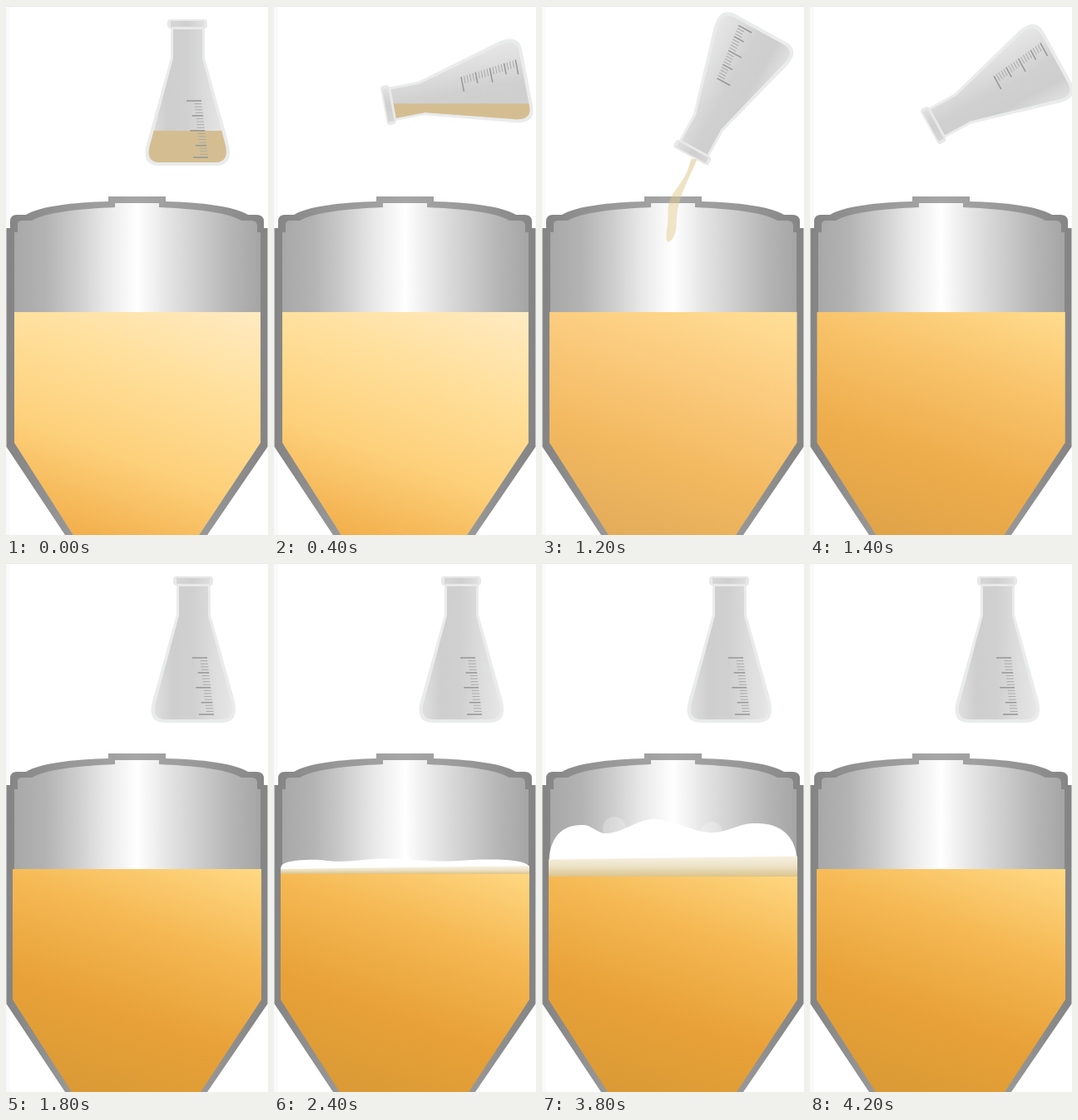
These frames come from a looping animation (315 by 636 pixels, 6.2 s). An HTML page with a canvas:

```html
<!DOCTYPE html>
<html lang="en">
<head>
<meta charset="utf-8">
<title>Pitching yeast</title>
<style>
  html, body { margin: 0; width: 100%; height: 100%; overflow: hidden; background: #fff; }
  canvas { display: block; width: 315px; height: 636px; }
</style>
</head>
<body>
<canvas id="stage"></canvas>
<script>
const W = 315, H = 636, LOOP = 6200, STEP = 200;
const canvas = document.getElementById('stage');
const ratio = window.devicePixelRatio || 1;
canvas.width = W * ratio;
canvas.height = H * ratio;
const c = canvas.getContext('2d');
c.scale(ratio, ratio);

const lerp = (a, b, k) => a + (b - a) * k;
const clamp = v => Math.max(0, Math.min(1, v));
const linear = k => k;
const wave = k => (1 - Math.cos(Math.PI * k)) / 2;

// Value at x between sorted [x, value] points
function along(points, x, ease = linear) {
  const i = points.findIndex(p => p[0] >= x);
  if (i < 0) return points[points.length - 1][1];
  if (i === 0) return points[0][1];
  const [x0, a] = points[i - 1], [x1, b] = points[i];
  return lerp(a, b, ease((x - x0) / (x1 - x0)));
}

function mix(a, b, k) {
  const part = (s, i) => parseInt(s.slice(i, i + 2), 16);
  return 'rgb(' + [1, 3, 5].map(i => Math.round(lerp(part(a, i), part(b, i), k))) + ')';
}

// Evenly spaced colours
function gradient(x0, y0, x1, y1, colors) {
  const g = c.createLinearGradient(x0, y0, x1, y1);
  colors.forEach((color, i) => g.addColorStop(i / (colors.length - 1), color));
  return g;
}

function fill(path, style) {
  c.fillStyle = style;
  c.fill(path);
}

function polygon(points) {
  const p = new Path2D();
  points.forEach(([x, y]) => p.lineTo(x, y));
  p.closePath();
  return p;
}

// ---- Tank ----
const shell = new Path2D('M.5 267H5V259Q5 251 13 251H24C40 241 80 236 123 235V229H192V235' +
  'C235 236 275 241 291 251H301Q310 251 310 259V267H314.5V530L242 636H71L.5 530Z');
const inside = new Path2D('M10 272H14V262Q14 258 20 258H31C48 248 88 244 131 242V237H184V242' +
  'C227 244 267 248 283 258H295Q302 258 302 264V272H306V525L232 636H81L10 525Z');

function drawTank() {
  fill(shell, gradient(0, 0, W, 0, ['#848484', '#989898', '#a6a6a6', '#989898', '#848484']));
  fill(inside, gradient(10, 0, 306, 0, ['#a8a8a8', '#b3b3b3', '#cccccc', '#e9e9e9', '#ffffff',
    '#e4e4e4', '#cdcdcd', '#b6b6b6', '#a5a5a5']));
}

const BEER = [
  ['#ffeac2', '#ffdf9a', '#fdd07a', '#f2ae4a'],
  ['#ffdf97', '#fbcb7e', '#f3b960', '#e3ac5a'],
  ['#ffd984', '#f5b853', '#e8a138', '#da9a35'],
];

function drawBeer(k) {
  const from = Math.min(1, Math.floor(k * 2));
  const colors = BEER[from].map((color, i) => mix(color, BEER[from + 1][i], k * 2 - from));
  const grow = 2 * k;
  fill(polygon([[10 - grow, 368], [306 + grow / 2, 368], [306 + grow / 2, 525],
    [232 + grow, H], [81 - grow, H], [10 - grow, 525]]), gradient(306, 368, 198, 678, colors));
}

// ---- Flask, drawn around its own centre ----
const glass = new Path2D('M-20 -80H21V-44L49 57Q57 86 34 86H-34Q-57 86 -48 57L-20 -44Z');
const hollow = new Path2D('M-17 -78H18V-43L45 58Q52 82 33 82H-33Q-52 82 -44 58L-17 -43Z');
const rim = new Path2D();
rim.roundRect(-24, -90, 48, 11, 4);

function drawTicks() {
  for (let i = 0; i < 20; i++) {
    const k = i / 19, major = i % 5 === 0 || k === 1;
    const x = 17 + 8 * k, y = 8 + 68 * k;
    const length = major ? (i % 10 === 5 ? 13.5 : 18) : 9;
    c.beginPath();
    c.moveTo(x - length, y);
    c.lineTo(x, y);
    c.lineWidth = major ? 1.5 : 1;
    c.strokeStyle = major ? '#969696' : '#aaaaaa';
    c.stroke();
  }
}

function drawFlask(t) {
  const back = t >= 1200;
  const k = back ? 1 - clamp((t - 1200) / 600) ** 1.4 : clamp(t / 600);
  const turn = k * 151.2 * Math.PI / 180;
  c.save();
  c.translate(lerp(back ? 225 : 218, 221.5, k), lerp(106, 102, k));
  c.rotate(-turn);
  fill(glass, '#eaebeb');
  fill(hollow, gradient(-50, 0, 50, 0, ['#e2e2e2', '#cecece', '#d0d0d0', '#dddddd', '#e7e7e7']));
  if (!back && k < 1) {
    c.save();
    c.clip(hollow);
    c.rotate(turn);
    c.fillStyle = '#d4be91';
    c.fillRect(-110, 44 - 45 * k, 220, 140);
    c.restore();
  }
  fill(rim, '#e8e8e8');
  c.fillStyle = gradient(-21, 0, 21, 0, ['#d6d6d6', '#cfcfcf', '#e0e0e0']);
  c.fillRect(-20, -88, 40, 7);
  drawTicks();
  c.restore();
}

// ---- Poured yeast: a bending stream with bulges ----
function drawStream({ end, width, drift, alpha }) {
  const left = [], right = [];
  for (let y = 184; y <= end; y += 2) {
    const u = (y - 184) / 185;
    const middle = 138 + 45 * (1 - u) ** 2.6 + drift * u + 2 * Math.sin(u * 17);
    const tip = end < 369 ? Math.sqrt(clamp((end - y) / 16)) : 1;
    const half = (5 + 7 * clamp(u / 0.55) + 1.6 * Math.cos(20 * (u - 0.58))) * width * tip;
    left.push([middle - half, y]);
    right.unshift([middle + half, y]);
  }
  c.globalAlpha = alpha;
  fill(polygon([...left, ...right]), gradient(0, 184, 0, 369, ['#d9c083', '#e4cc90', '#e0c98c', '#ead6a2']));
  c.globalAlpha = 1;
}

function drawPour(t) {
  if (t < 600 || t >= 1400) return;
  const fade = clamp((t - 800) / 400);
  drawStream({
    end: t < 1200 ? 369 : 284,
    width: t < 800 ? 0.8 : lerp(1, 0.6, fade),
    drift: 14 * fade,
    alpha: lerp(1, 0.5, fade),
  });
}

// ---- Foam ----
const LEVEL = [[2200, 0.12], [2800, 0.35], [3000, 0.46], [3400, 1.2], [3800, 1], [4000, 0.46]];
const CREST = [[9, 52], [50, 52], [76, 42], [135, 59], [205, 43], [255, 54], [307, 54]];

function crest(x) {
  const off = Math.max((50 - x) / 42, (x - 255) / 52, 0);
  return along(CREST, x, wave) * (1 - Math.min(1, off) ** 2.5) ** 0.4;
}

function drawBubble(x, y, r) {
  c.fillStyle = 'rgba(255,255,255,.25)';
  c.beginPath();
  c.arc(x, y, r, 0, Math.PI * 2);
  c.fill();
}

function drawFoam(t) {
  if (t < 2200 || t >= 4200) return;
  const k = along(LEVEL, t);
  if (k > 0.3) {
    drawBubble(87, 367 - 48 * k, 8.5 + 5.5 * k);
    drawBubble(231 - 27 * k, 367 - 43 * k, 8 + 5 * k);
  }
  const points = [[8, 370]];
  for (let x = 8; x <= 307; x++) points.push([x, 367 - crest(x) * k]);
  fill(polygon([...points, [307, 370]]), '#ffffff');

  const top = 367 - 11.5 * clamp((k - 0.45) / 0.55), bottom = 373 + 4 * Math.min(k, 1);
  fill(polygon([[8, top + 1], [307, top - 3], [307, bottom], [8, bottom]]),
    gradient(0, top - 2, 0, bottom, ['#f6f0e0', '#ece1c5', '#dbc48d']));
}

function draw(t) {
  c.fillStyle = '#ffffff';
  c.fillRect(0, 0, W, H);
  c.fillStyle = '#fafafa';
  c.fillRect(0, 0, 5, H);
  c.fillStyle = '#e9e9e9';
  c.fillRect(0, 0, W, 1);
  drawTank();
  drawBeer(clamp((t - 800) / 800));
  drawFoam(t);
  drawPour(t);
  drawFlask(t);
}

const start = performance.now();
function tick() {
  const t = (performance.now() - start) % LOOP;
  draw(Math.floor(t / STEP) * STEP);
  requestAnimationFrame(tick);
}
tick();
</script>
</body>
</html>
```
